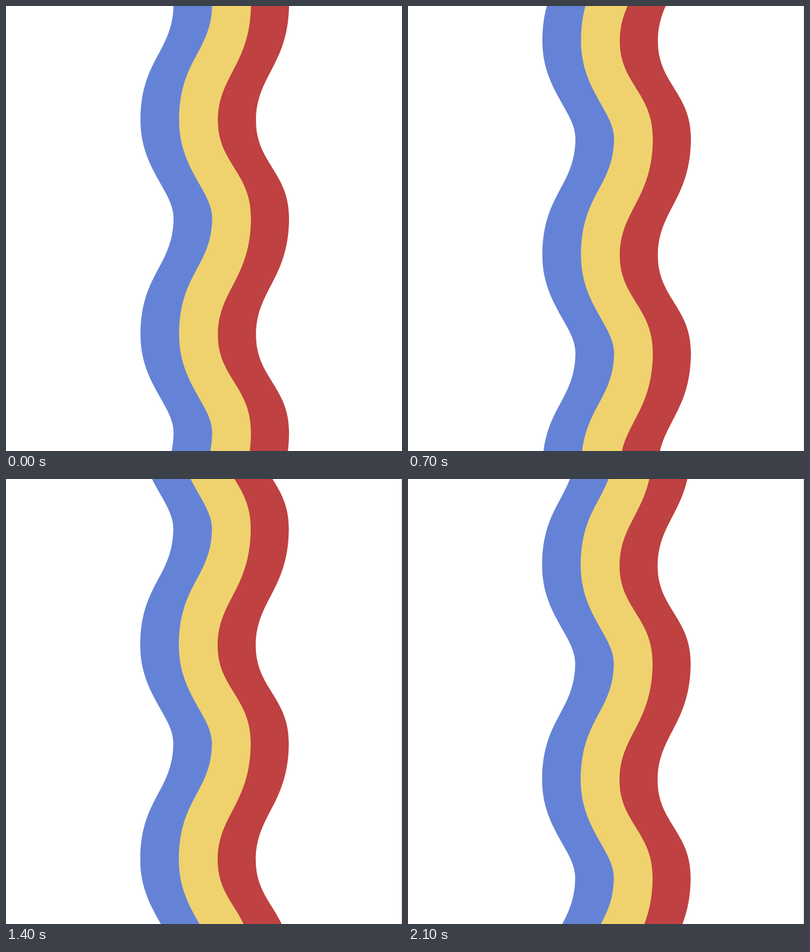
An HTML page with a canvas that plays this animation: 683x768 px, repeating every 2200 ms.

```html
<!DOCTYPE html>
<html lang="en">
<head>
<meta charset="utf-8">
<title>Flowing stripes</title>
<style>
  html, body { margin: 0; height: 100%; overflow: hidden; background: #fff; }
  canvas { display: block; }
</style>
</head>
<body>
<canvas id="stage" width="683" height="768"></canvas>
<script>
const W = 683, H = 768, LOOP = 2200, TICK = 100;
const WAVE = 370, SWING = 57, CREST = -5, FALL = 203, DRIFT = -0.7;

// Bezier handle lengths: leaving the crest, around the trough, reaching the next crest
const wideTrough = { leave: 84, into: 107, out: 83, reach: 45 };
const wideCrest = { leave: 106, into: 78, out: 73, reach: 78 };

// Each layer covers everything right of its left edge; x is the trough of that edge.
const layers = [
  { color: '#6583d6', x: 232, bend: wideTrough },
  { color: '#efd26e', x: 298.6, bend: wideTrough },
  { color: '#bf4141', x: 365.5, bend: wideCrest },
  { color: '#fff', x: 431.2, bend: wideCrest }
];

// [tick, distance scrolled]: slightly faster at both ends of the loop
const scroll = [[0, 0], [3, 103], [18, 589.5], [21, 692], [22, 2 * WAVE]];

const ctx = document.getElementById('stage').getContext('2d');

function offsetAt(tick) {
  const i = scroll.findIndex(([t]) => t > tick);
  const [t0, d0] = scroll[i - 1], [t1, d1] = scroll[i];
  return d0 + (d1 - d0) * (tick - t0) / (t1 - t0);
}

function drawLayer({ color, x, bend }, top) {
  const right = x + SWING;
  ctx.fillStyle = color;
  ctx.beginPath();
  ctx.moveTo(W, top);
  ctx.lineTo(right, top);
  let y = top;
  for (; y < H; y += WAVE) {
    const trough = y + FALL, next = y + WAVE;
    ctx.bezierCurveTo(right, y + bend.leave, x, trough - bend.into, x, trough);
    ctx.bezierCurveTo(x, trough + bend.out, right, next - bend.reach, right, next);
  }
  ctx.lineTo(W, y);
  ctx.fill();
}

function draw(time) {
  const offset = offsetAt(Math.floor(time % LOOP / TICK));
  const top = offset % WAVE + CREST - WAVE;
  ctx.fillStyle = '#fff';
  ctx.fillRect(0, 0, W, H);
  ctx.save();
  ctx.translate(DRIFT * offset / (2 * WAVE), 0);
  for (const layer of layers) drawLayer(layer, top);
  ctx.restore();
}

const start = performance.now();
function loop() {
  draw(performance.now() - start);
  requestAnimationFrame(loop);
}
loop();
</script>
</body>
</html>
```
